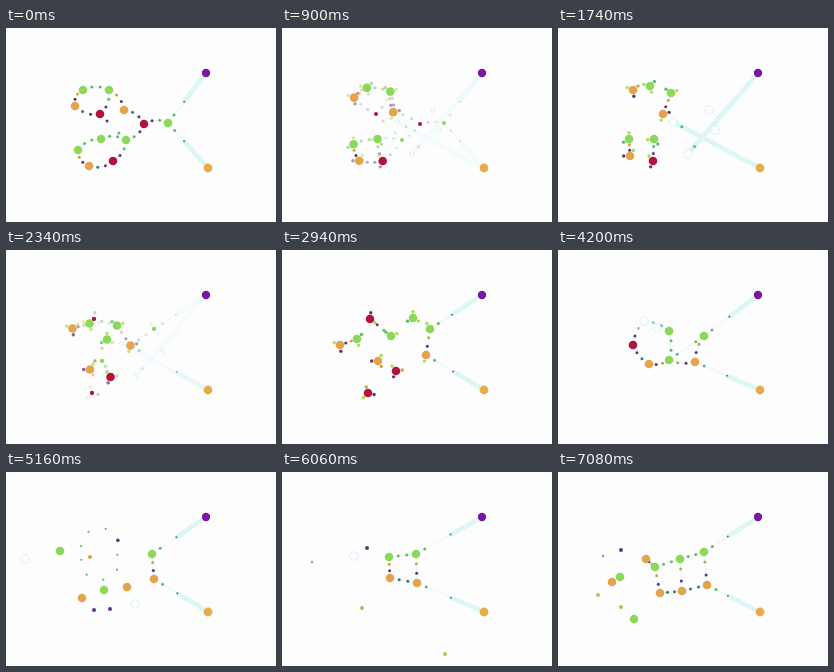
An HTML page with a canvas that plays this animation: 270 px wide and 194 px high, repeating every 7.14 s.

```html
<!DOCTYPE html>
<html lang="en">
<head>
<meta charset="utf-8">
<title>Graph rewriting</title>
<style>
html, body { margin: 0; width: 100%; height: 100%; overflow: hidden; background: #fdfdfe; }
canvas { display: block; width: 100vw; height: 100vh; }
</style>
</head>
<body>
<canvas id="stage"></canvas>
<script>
const W = 270, H = 194, LOOP = 7140, STEP = 60;
const canvas = document.getElementById('stage');
const ctx = canvas.getContext('2d');
const ratio = window.devicePixelRatio || 1;
canvas.width = W * ratio;
canvas.height = H * ratio;

// Letters choose the kind: a-g green, o-s orange, u-w crimson, h-k hollow, digits loose ports.
const GREEN = '#8cd95a', ORANGE = '#e3a44c', RED = '#b0143c', PURPLE = '#7c16a0';
const LEAF = '#5cc060', LIME = '#a6e04a', GOLD = '#cfa048', PLUM = '#64327f', TEAL = '#2f8070';
const PAPER = '#fdfdfe';
const ROOTS = { P: { x: 200, y: 45, s: 1 }, O: { x: 202, y: 140, s: 1 } };

// bow bends short wires outward, free draws the unconnected ports of each node.
function scene(at, nodes, wires, { bow = 0, free = false } = {}) {
  const pos = {}, degree = {};
  for (const item of nodes.split(' ')) {
    const [x, y] = item.slice(1).split(',').map(Number);
    pos[item[0]] = { x, y };
  }
  const links = wires.split(' ');
  for (const link of links) for (const id of link) degree[id] = (degree[id] || 0) + 1;
  return { at, pos, links, degree, bow, free };
}

const scenes = [
  scene(0, 'a162,95 b103,62 c77,62 d95,111 e72,122 f120,112 o118,82 p69,78 q83,138 u138,96 v94,86 w107,133',
    'Pa Oa au uo ob bc cp pv vb vf fu wf qw eq de fd', { bow: 3 }),
  scene(1740, 'b113,65 c92,58 d96,111 e71,111 o105,86 p75,62 q72,128 w95,133 h115,94 i157,102 j151,82 k130,126',
    'Pk Oh bo eq dw', { free: true }),
  scene(2940, 'a148,79 b109,86 c75,89 e131,68 o144,105 p58,95 q96,111 u88,69 v86,143 w114,121',
    'Pa Oo ao ub cp', { free: true }),
  scene(4200, 'a146,86 b111,81 c111,110 o137,112 p91,114 u75,95 h86,71 i99,78',
    'Pa Oo ao ac cb bh hu up pc co', { bow: 2 }),
  scene(5160, 'a146,82 c98,118 e54,79 o148,107 p76,126 q121,115 h19,87 i129,132 188,138 2104,137',
    'Pa Oo ao'),
  scene(6060, 'a134,82 b107,85 o135,111 p108,106 h72,84 185,76 330,90 480,136 5163,182',
    'Pa Oo ao ab bp po'),
  scene(7080, 'a146,80 b97,95 c122,87 d62,105 e76,147 o149,113 p102,121 q124,119 r54,110 s88,87 163,78 345,84 440,123 563,135',
    'Pa Oo ao ac cb cq bp pq qo bs')
];

const ids = [...new Set(scenes.flatMap(s => Object.keys(s.pos)))];
const isGreen = id => /[a-g]/.test(id);
const isOrange = id => /[o-s]/.test(id);
const isHollow = id => /[h-k]/.test(id);
const isLoose = id => /\d/.test(id);
const mix = (a, b, k) => a + (b - a) * k;
const smooth = k => k * k * (3 - 2 * k);

function dot(x, y, r, fill) {
  if (r <= 0) return;
  ctx.beginPath();
  ctx.arc(x, y, r, 0, Math.PI * 2);
  ctx.fillStyle = fill;
  ctx.fill();
}

function line(x1, y1, x2, y2, width, color, dash = [], bendX = 0, bendY = 0) {
  ctx.beginPath();
  ctx.setLineDash(dash);
  ctx.moveTo(x1, y1);
  ctx.quadraticCurveTo((x1 + x2) / 2 + bendX, (y1 + y2) / 2 + bendY, x2, y2);
  ctx.lineWidth = width;
  ctx.strokeStyle = color;
  ctx.stroke();
  ctx.setLineDash([]);
}

function portColor(id, other) {
  if (isGreen(id)) return isOrange(other) ? GOLD : LEAF;
  if (isOrange(id)) return isGreen(other) ? PLUM : TEAL;
  return isHollow(id) ? '#8fd49b' : PLUM;
}

function drawBand(a, ex, ey) {
  line(a.x, a.y, ex, ey, 5, '#e9f9f9');
  line(a.x, a.y, ex, ey, 4.4, '#c3eef0', [0.8, 1.8]);
}

function drawWire(link, nodes, weight, bow) {
  const a = nodes[link[0]], b = nodes[link[1]];
  if (!a || !b) return;
  const dx = b.x - a.x, dy = b.y - a.y, len = Math.hypot(dx, dy) || 1;
  const ux = dx / len, uy = dy / len;
  const root = link[0] in ROOTS;
  const bend = root || len > 32 ? 0 : bow;
  const bx = -uy * bend, by = ux * bend;
  ctx.globalAlpha = weight * Math.min(a.s, b.s);
  line(a.x, a.y, b.x, b.y, 0.9, '#dff5f5', [], bx * 2, by * 2);
  const far = Math.min(10, len * 0.34);
  const near = !root ? far : isHollow(link[1]) ? len : Math.min(36, len * 0.7);
  const ex = a.x + ux * near + bx, ey = a.y + uy * near + by;
  if (root) drawBand(a, ex, ey);
  dot(ex, ey, root ? 1 : 1.5, root ? TEAL : portColor(link[0], link[1]));
  dot(b.x - ux * far + bx, b.y - uy * far + by, 1.5, root ? LEAF : portColor(link[1], link[0]));
}

function drawFreePorts(s, nodes, weight) {
  ids.forEach((id, n) => {
    if (!s.pos[id] || isHollow(id) || isLoose(id)) return;
    const p = nodes[id];
    const colors = isGreen(id) ? [LIME, LEAF, LIME] : [GOLD, PLUM, LIME];
    ctx.globalAlpha = weight * p.s;
    for (let k = s.degree[id] || 0; k < 3; k++) {
      const angle = n * 1.7 + k * 2.1;
      dot(p.x + 6.3 * Math.cos(angle), p.y + 6.3 * Math.sin(angle), 1.7, colors[k]);
    }
  });
}

function drawRing(t) {
  const fade = Math.max(0, 1 - Math.abs(t - 5160) / 650);
  if (!fade) return;
  ctx.globalAlpha = fade;
  for (let i = 0; i < 9; i++) {
    const angle = i * Math.PI * 2 / 9 - 1.35 + (t - 5160) / 2200;
    const r = 17 + 9 * Math.abs(Math.sin(angle));
    dot(94 + r * Math.cos(angle), 82 + r * Math.sin(angle), i === 1 ? 1.8 : 1.1, i === 1 ? PLUM : LEAF);
  }
  dot(84, 85, 2, GOLD);
}

function drawNode(id, p) {
  ctx.globalAlpha = 1;
  if (isHollow(id)) {
    if (p.s < 0.05) return;
    dot(p.x, p.y, 4.2 * p.s, PAPER);
    ctx.setLineDash([1, 1]);
    ctx.lineWidth = 0.8;
    ctx.strokeStyle = '#a9dce8';
    ctx.stroke();
    ctx.setLineDash([]);
  } else if (isLoose(id)) {
    dot(p.x, p.y, (id === '3' ? 1.2 : 2) * p.s, id < '3' ? PLUM : id === '3' ? LEAF : '#abc84c');
  } else {
    dot(p.x, p.y, 4.3 * p.s, isGreen(id) ? GREEN : isOrange(id) ? ORANGE : RED);
  }
}

function draw(t) {
  let i = 0;
  while (i < scenes.length - 2 && t >= scenes[i + 1].at) i++;
  const from = scenes[i], to = scenes[i + 1];
  const k = smooth(Math.min(1, (t - from.at) / (to.at - from.at)));
  const nodes = { ...ROOTS };
  for (const id of ids) {
    const a = from.pos[id], b = to.pos[id];
    if (!a && !b) continue;
    const p = a || b, q = b || a;
    nodes[id] = { x: mix(p.x, q.x, k), y: mix(p.y, q.y, k), s: a && b ? 1 : a ? 1 - k : k };
  }

  ctx.setTransform(canvas.width / W, 0, 0, canvas.height / H, 0, 0);
  ctx.globalAlpha = 1;
  ctx.fillStyle = PAPER;
  ctx.fillRect(0, 0, W, H);

  const bow = mix(from.bow, to.bow, k);
  for (const link of new Set([...from.links, ...to.links])) {
    const weight = (from.links.includes(link) ? 1 - k : 0) + (to.links.includes(link) ? k : 0);
    drawWire(link, nodes, weight, bow);
  }
  if (from.free) drawFreePorts(from, nodes, 1 - k);
  if (to.free) drawFreePorts(to, nodes, k);
  drawRing(t);
  for (const id of ids) if (nodes[id]) drawNode(id, nodes[id]);
  ctx.globalAlpha = 1;
  dot(ROOTS.P.x, ROOTS.P.y, 4.2, PURPLE);
  dot(ROOTS.O.x, ROOTS.O.y, 4.4, '#e9ab45');
}

const start = performance.now();
function tick() {
  const t = (performance.now() - start) % LOOP;
  draw(Math.floor(t / STEP) * STEP);
  requestAnimationFrame(tick);
}
tick();
</script>
</body>
</html>
```
